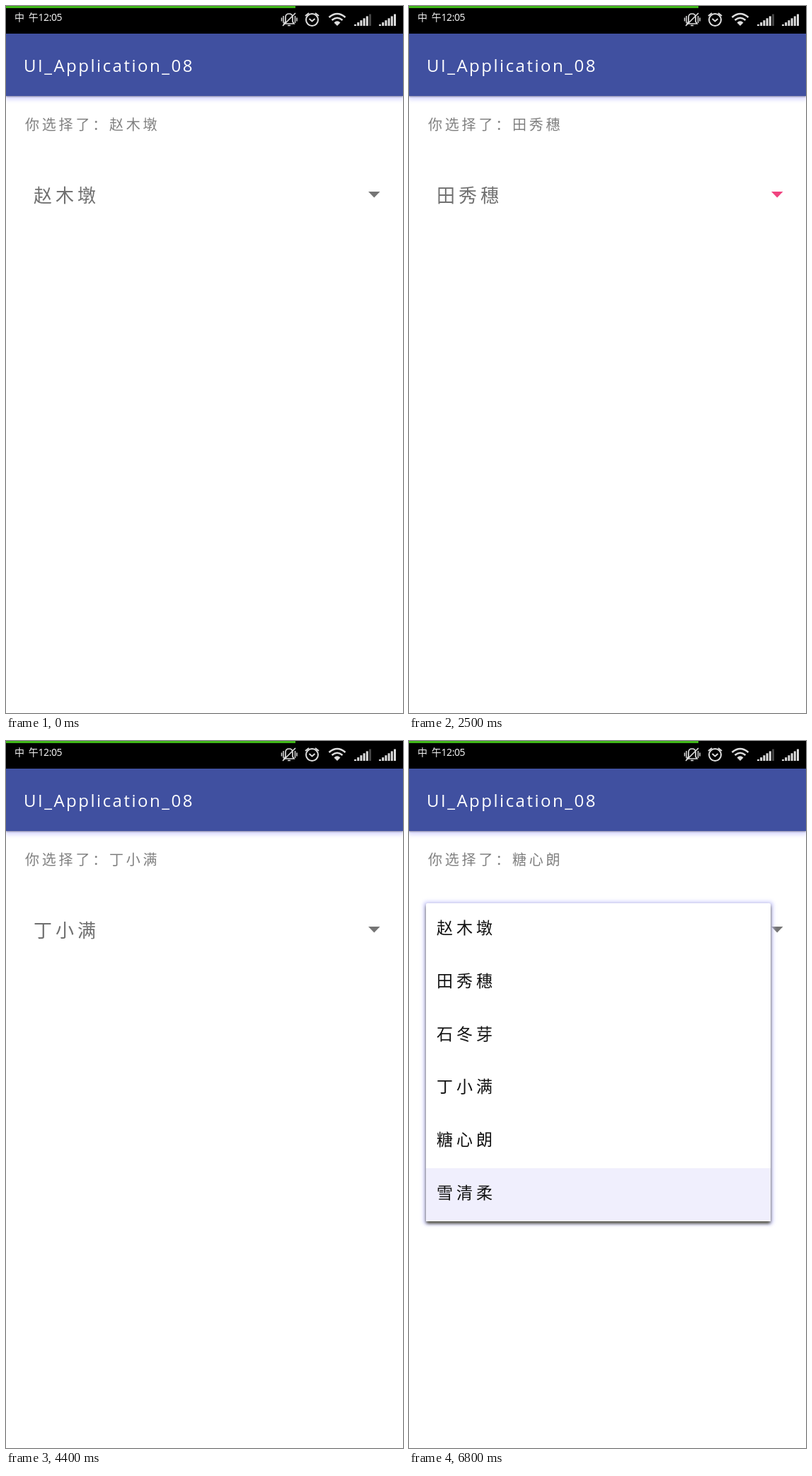
These frames come from a looping animation (561x998 px, 7000 ms). An HTML page:

```html
<!DOCTYPE html>
<html lang="zh">
<head>
<meta charset="utf-8">
<style>
html, body { margin: 0; width: 100%; height: 100%; overflow: hidden; background: #fff; }
body { position: relative; font-family: "Noto Sans CJK SC", "Noto Sans CJK", sans-serif; font-weight: 300; }
div, svg { position: absolute; white-space: nowrap; }
#status { width: 561px; height: 39px; background: #000; }
#progress { width: 409px; height: 3px; background: #3fb618; }
#clock { left: 12px; top: 6px; color: #eee; font: 500 14px/20px "Noto Sans", "Noto Sans CJK SC", sans-serif; letter-spacing: -.4px; word-spacing: 3px; }
#bar {
  top: 39px; width: 561px; height: 88px; background: #4050a0;
  box-shadow: 0 1px 2px rgba(60, 60, 80, .55), 0 4px 6px 1px rgba(200, 200, 255, .7);
}
#title { left: 25px; top: 25px; color: #fff; font: 500 24px/40px "Open Sans", sans-serif; letter-spacing: 2.5px; }
#chosen { left: 27px; top: 152px; font-size: 20px; line-height: 30px; letter-spacing: 3.8px; color: #808080; }
#label { left: 39px; top: 246px; font-size: 26px; line-height: 40px; letter-spacing: 5px; color: #707070; }
#popup {
  left: 24px; top: 229px; width: 487px; height: 449px; background: #fff; border-radius: 2px;
  transform-origin: 50% -10px;
  box-shadow: 0 4px 4px -1px rgba(75, 75, 55, .85), 0 2px 4px rgba(90, 90, 80, .6), 0 1px 5px 4px rgba(205, 205, 255, .75);
}
.row { width: 472px; height: 74.8px; padding-left: 15px; font-size: 23px; line-height: 66px; letter-spacing: 5px; color: #111; font-weight: 400; }
</style>
</head>
<body>
<div id="bar"><div id="title">UI_Application_08</div></div>
<div id="status">
  <div id="progress"></div>
  <div id="clock">中 午12:05</div>
</div>
<svg id="icons" width="561" height="300" fill="none" stroke="#ddd" stroke-width="2">
  <path d="M393 25H407L405 22V16Q405 11 400 11T395 16V22ZM398 27.5H402M391 28L409 10" stroke-width="1.7"/>
  <path d="M392 14V24M389.5 16.5V21.5M408.5 14V24M411 16.5V21.5" stroke-width="1.5"/>
  <circle cx="432.5" cy="19.5" r="8.5"/>
  <path d="M428.5 18L432.5 21.5L436.5 18M423 14L428 10M442 14L437 10"/>
  <path d="M456.5 16Q468 6 479.5 16M460.5 20Q468 13.5 475.5 20" stroke-width="2.6"/>
  <path d="M463.5 23.5Q468 19 472.5 23.5L468 28Z" fill="#ddd" stroke="none"/>
  <g id="signal" stroke="none"></g>
  <path id="arrow" d="M512 262H528.5L520.25 270.5Z" stroke="none"/>
</svg>
<div id="chosen"></div>
<div id="label"></div>
<div id="popup"></div>
<script>
const LOOP = 7000, STEP = 100, FADE = 300;
const names = ["赵木墩", "田秀穗", "石冬芽", "丁小满", "糖心朗", "雪清柔"];
// Each visit: arrow held, list opened, row touched, list closed
const visits = [
  { press: 600, release: 900, open: 874, touch: 1700, close: 1830, row: 1 },
  { press: 2300, release: 2600, open: 2670, touch: 3300, close: 3430, row: 3 },
  { press: 4100, release: 4400, open: 4410, touch: 5400, close: 5630, row: 4 },
  { press: 6000, release: 6200, open: 6170, touch: 6600, close: LOOP, row: 5 }
];
const $ = id => document.getElementById(id);

const rows = names.map((name, i) => {
  const row = document.createElement("div");
  row.className = "row";
  row.style.top = i * 74.8 + "px";
  row.textContent = name;
  $("popup").append(row);
  return row;
});

function addSignal(x, lit) {
  for (let i = 0; i < 6; i++) {
    const bar = document.createElementNS("http://www.w3.org/2000/svg", "rect");
    const h = 2 + i * 2.9;
    const attrs = { x: x + i * 4.2, y: 28 - h, width: 3, height: h, fill: i < lit ? "#ddd" : "#444" };
    for (const key in attrs) bar.setAttribute(key, attrs[key]);
    $("signal").append(bar);
  }
}
addSignal(492, 5);
addSignal(527, 6);

const decelerate = t => 1 - (1 - Math.min(1, Math.max(0, t))) ** 2;

function draw(t) {
  let picked = 0, shown = 0, touched = -1, held = false;
  for (const v of visits) {
    if (t >= v.press && t < v.release) held = true;
    if (t >= v.close) picked = v.row;
    if (t >= v.touch && t < v.close) touched = v.row;
    if (t >= v.open) shown = decelerate((t - v.open) / FADE) - decelerate((t - v.close) / FADE);
  }
  $("chosen").textContent = "你选择了：" + names[picked];
  $("label").textContent = names[picked];
  $("arrow").setAttribute("fill", held ? "#f0437f" : "#757575");
  $("popup").style.opacity = shown;
  $("popup").style.transform = `scale(${0.9 + 0.1 * shown})`;
  rows.forEach((row, i) => row.style.background = i === touched ? "#f0effd" : "none");
}

const start = performance.now();
function tick() {
  const t = (performance.now() - start) % LOOP;
  draw(Math.floor(t / STEP) * STEP);
  requestAnimationFrame(tick);
}
tick();
</script>
</body>
</html>
```
